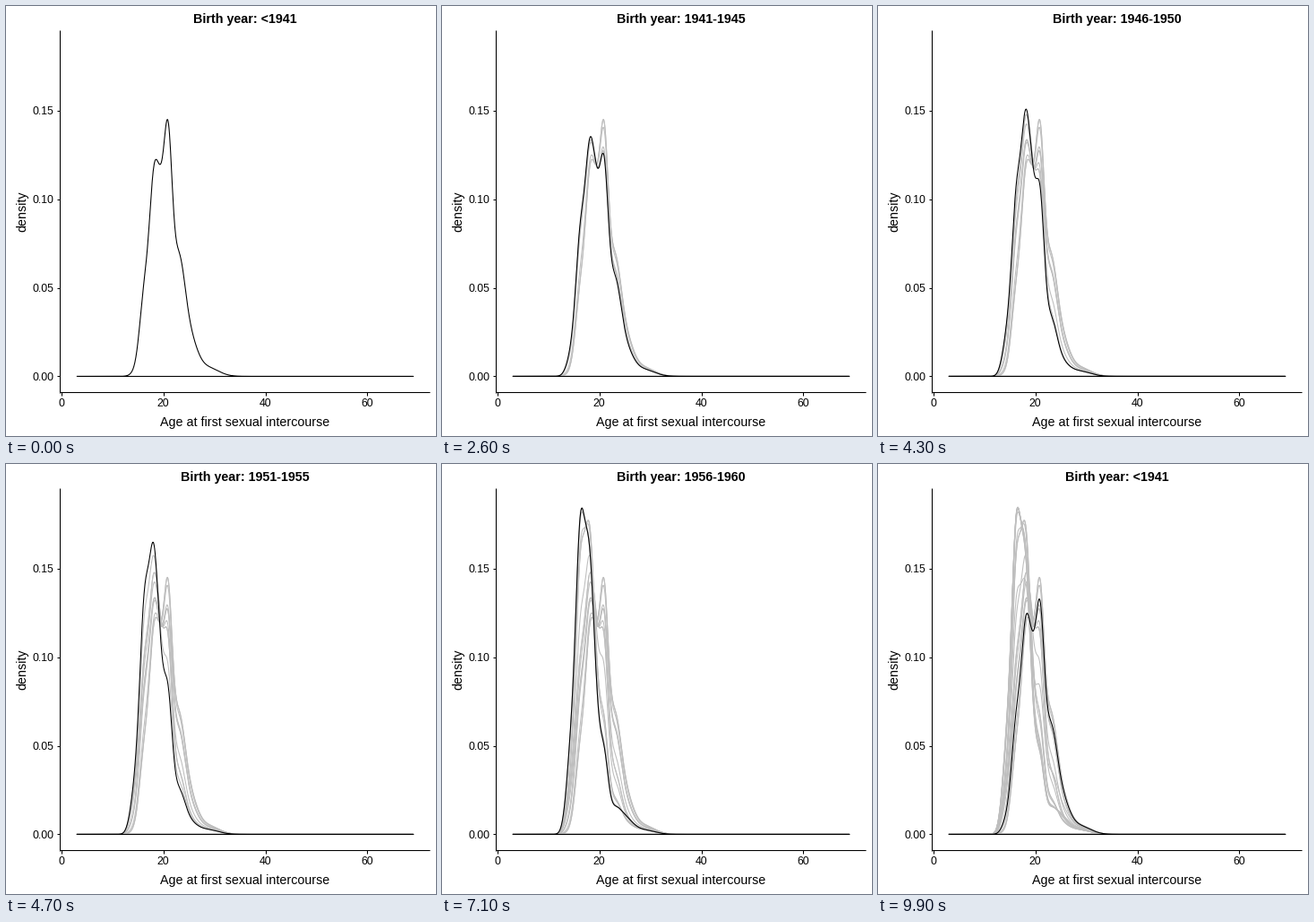
A matplotlib script that plays this animation: 480 by 480 pixels, repeating every 10 s.

```python
import matplotlib.pyplot as plt
import numpy as np
from matplotlib.animation import FuncAnimation

plt.rcParams["font.family"] = "Liberation Sans"

SIZE, FRAMES, INTERVAL = 480, 100, 100
LEFT, RIGHT, TOP, BOTTOM = 60, 473, 27.3, 431
STEPS, TRAIL = 8, 5         # frames per transition, frames per trail mark
LW, BIG, SMALL = 1.07, 14.3, 12.2

# every cohort mixes the same bell curves; weights are peaks in density / 1000
CENTRES = np.array([14.3, 16.2, 18, 19.3, 20.8, 22.9, 25, 28.5])
WIDTHS = np.array([0.9, 0.95, 0.87, 0.8, 0.85, 1.2, 1.5, 2.2])
COHORTS = {
    "<1941": [1.5, 44.5, 93, 63, 120.5, 58, 20, 5],
    "1941-1945": [8, 73, 103, 63, 104, 50.5, 15, 4],
    "1946-1950": [18, 87, 114.5, 67, 95, 31, 7, 3],
    "1951-1955": [23, 141, 138, 50, 55, 17, 5, 2.5],
    "1956-1960": [40, 162, 124.5, 40.5, 40.5, 11.5, 8, 2.5],
    ">1960": [43, 163, 121.5, 35.5, 37.5, 11, 8.5, 3],
}
LABELS = list(COHORTS)
COUNT = len(LABELS)
# last resting frame of each cohort, evenly spread and ending with the loop
STARTS = [int(FRAMES * (k + 1) / COUNT) - STEPS for k in range(COUNT)]


def age_x(age):
    return 62.4 + 5.685 * age


def density_y(d):
    return 413.45 - 1976 * d


ages = np.linspace(3, 69, 700)
bells = np.exp(-((ages[:, None] - CENTRES) / WIDTHS) ** 2 / 2)
curves = [bells @ np.array(w) / 1000 for w in COHORTS.values()]


def state_at(frame):
    """Density curve and cohort label of a frame."""
    k = next(i for i, s in enumerate(STARTS) if frame < s + STEPS)
    t = max(0, frame - STARTS[k]) / STEPS
    nxt = (k + 1) % COUNT
    return (1 - t) * curves[k] + t * curves[nxt], LABELS[nxt if t >= 0.5 else k]


def outline(frame):
    """Along the curve, then back along the baseline."""
    d, _ = state_at(frame)
    return age_x(np.r_[ages, ages[-1], ages[0]]), density_y(np.r_[d, 0, 0])


fig = plt.figure(figsize=(SIZE / 72, SIZE / 72), dpi=72, facecolor="white")
ax = fig.add_axes([0, 0, 1, 1])
ax.set(xlim=(0, SIZE), ylim=(SIZE, 0))
ax.axis("off")


def rule(x, y):
    ax.plot(x, y, color="black", lw=LW, solid_capstyle="butt")


def label(x, y, s, size, ha="center", **kw):
    return ax.text(x, y, s, fontsize=size, ha=ha, va="baseline",
                   rotation_mode="anchor", **kw)


rule([LEFT, LEFT], [TOP, BOTTOM + 1])
rule([LEFT, RIGHT], [BOTTOM, BOTTOM])
for age in (0, 20, 40, 60):
    x = age_x(age)
    rule([x, x], [BOTTOM, BOTTOM + 4])
    label(x - 0.5, 447, str(age), SMALL)
for d in (0, 0.05, 0.1, 0.15):
    y = density_y(d)
    rule([LEFT - 3, LEFT], [y, y])
    label(53.7, round(y + 4.2), f"{d:.2f}", SMALL, ha="right")

mid = (LEFT + RIGHT) / 2 + 0.3
label(mid, 469, "Age at first sexual intercourse", BIG)
label(22, (TOP + BOTTOM) / 2, "density", BIG, rotation=90)
title = label(mid, 19, "", BIG, weight="bold")

trail = [ax.plot(*outline(f), color="#bebebe", lw=LW, snap=False)[0]
         for f in range(0, FRAMES, TRAIL)]
line, = ax.plot([], [], color="black", lw=LW, snap=False, zorder=3)


def update(frame):
    for k, mark in enumerate(trail):
        mark.set_visible(k * TRAIL < frame)
    line.set_data(*outline(frame))
    title.set_text("Birth year: " + state_at(frame)[1])
    return [*trail, line, title]


anim = FuncAnimation(fig, update, frames=FRAMES, interval=INTERVAL,
                     repeat=True, repeat_delay=0, blit=False)
plt.show()
```
